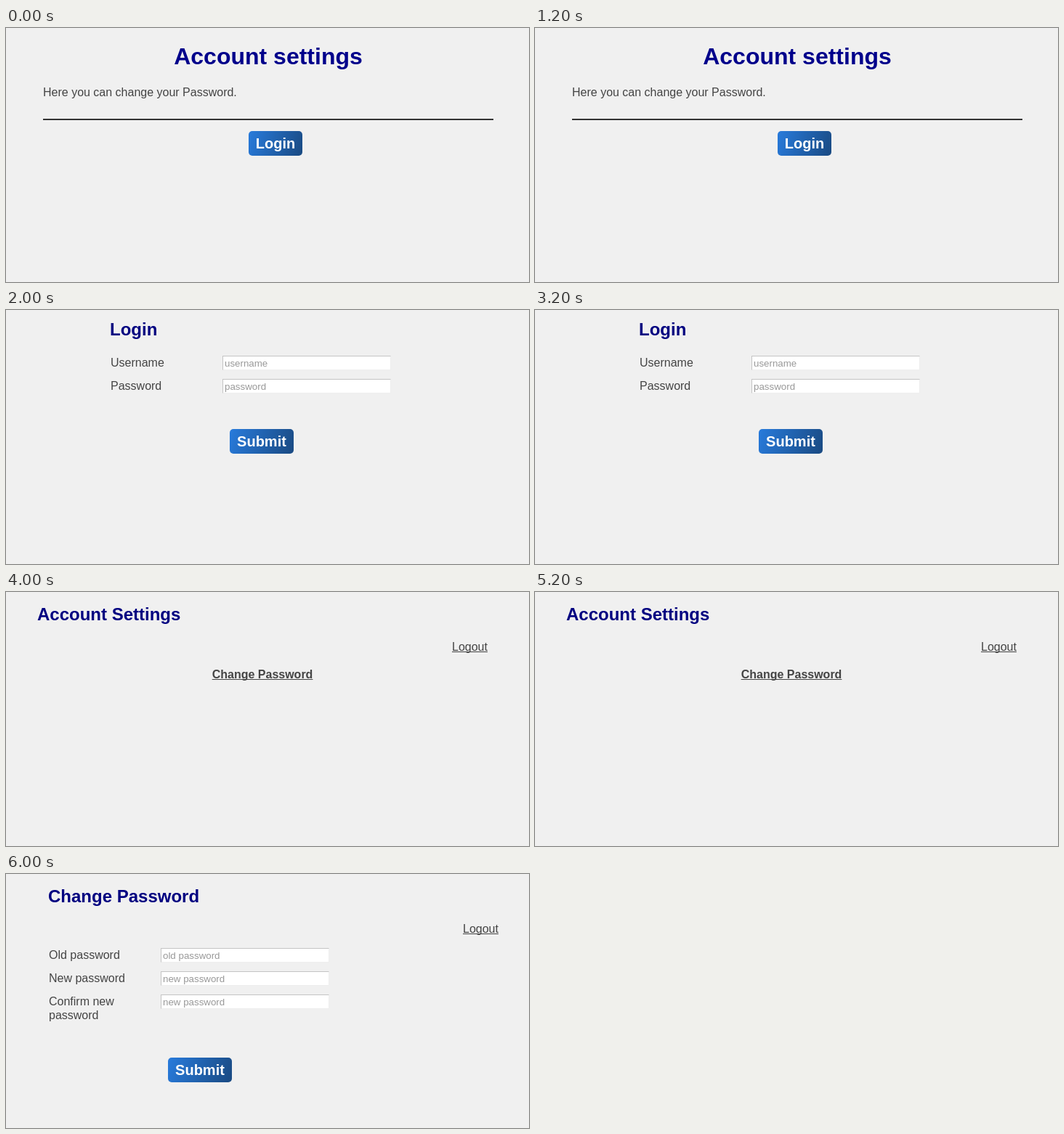
Recreate the animation shown at these times as an HTML page. Size 720 by 350 pixels, loop 8 s.

```html
<!DOCTYPE html>
<html lang="en">
<head>
<meta charset="utf-8">
<title>Account settings</title>
<style>
html, body { margin: 0; width: 100%; height: 100%; overflow: hidden; background: #f0f0f0; }
body { position: relative; font: 16px "Liberation Sans", Arial, sans-serif; color: #444; }
section { position: absolute; inset: 0; visibility: hidden; }
section * { position: absolute; white-space: pre; box-sizing: border-box; }
.title { color: #000080; font-weight: bold; }
.link { text-decoration: underline; text-decoration-skip-ink: none; }
.bold { font-weight: bold; }
.hint { color: #999; }
.rule { left: 51px; top: 125px; width: 620px; height: 2px; background: #333; }
.field { width: 232px; height: 20px; background: #fff; border: 1px solid; border-color: #c4c4c4 #eee #eee #c4c4c4; }
.button {
  height: 34px; padding: 0 10px; border-radius: 5px; color: #fff;
  font: bold 20px/34px "Liberation Sans", Arial, sans-serif;
  background: linear-gradient(110deg, #287bdc, #1a4a82);
}
</style>
</head>
<body>
<script>
const HOLD = 2000;
const pages = [];
let page;

function newPage() {
  page = document.body.appendChild(document.createElement("section"));
  pages.push(page);
}

function box(cls, x, y, label = "") {
  const el = page.appendChild(document.createElement("div"));
  el.className = cls;
  el.style.left = x + "px";
  el.style.top = y + "px";
  el.textContent = label;
  return el;
}

// y is the baseline
function text(label, x, y, size = 16, cls = "") {
  const el = box(cls, x, y - Math.round(size * 0.905), label);
  el.style.fontSize = size + "px";
  return el;
}

function field(hint, x, y) {
  box("field", x, y);
  text(hint, x + 3, y + 15, 13.333, "hint");
}

newPage();
text("Account settings", 231.2, 50, 32, "title").style.color = "#00008b";
text("Here you can change your Password.", 51, 94);
page.appendChild(document.createElement("div")).className = "rule";
box("button", 333.8, 142, "Login");

newPage();
text("Login", 143, 35, 24, "title");
["Username", "Password"].forEach((name, i) => {
  text(name, 144, 78 + 32 * i);
  field(name.toLowerCase(), 298, 63 + 32 * i);
});
box("button", 308.1, 164, "Submit");

newPage();
text("Account Settings", 43, 39, 24, "title");
text("Logout", 614, 81, 16, "link");
text("Change Password", 283.7, 119, 16, "link bold");

newPage();
text("Change Password", 58, 39, 24, "title");
text("Logout", 629, 81, 16, "link");
["Old password", "New password", "Confirm new"].forEach((name, i) => {
  text(name, 59, 117 + 32 * i);
  field(i ? "new password" : "old password", 213, 102 + 32 * i);
});
text("password", 59, 200);
box("button", 223.1, 253, "Submit");

const start = performance.now();
function draw() {
  const now = Math.floor((performance.now() - start) / HOLD) % pages.length;
  pages.forEach((p, i) => p.style.visibility = i === now ? "visible" : "hidden");
  requestAnimationFrame(draw);
}
draw();
</script>
</body>
</html>
```
